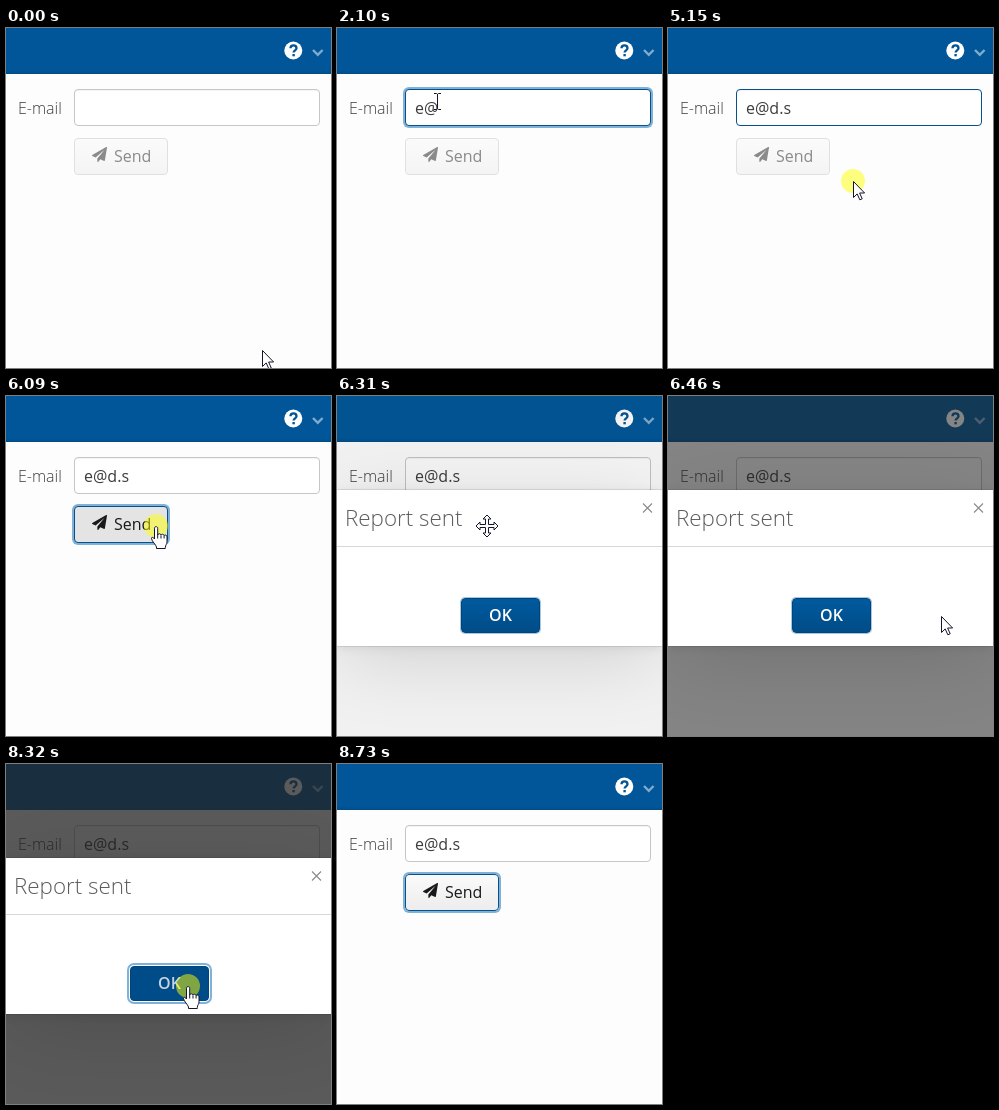
An HTML page for the animation above (9420 ms loop, 325 px wide and 340 px high).

```html
<!DOCTYPE html>
<html lang="en">
<head>
<meta charset="utf-8">
<title>E-mail form</title>
<style>
  html, body { margin: 0; width: 100%; height: 100%; overflow: hidden; }
  body { background: #fdfdfd; }
  #stage {
    position: relative; width: 325px; height: 340px; overflow: hidden;
    background: #fdfdfd; color: #464646; cursor: default;
    font: 400 16px/37px "Open Sans", sans-serif; white-space: pre;
  }
  #stage div, #stage svg { position: absolute; box-sizing: border-box; }
  svg { left: 0; top: 0; overflow: visible; }

  .bar { left: 0; top: 0; width: 325px; height: 46px; background: linear-gradient(#005698 42px, #004e8a); }
  .label { left: 12px; top: 62px; font-weight: 300; color: #3c3c3c; }

  .field {
    left: 68px; top: 61px; width: 246px; height: 37px;
    border: 1px solid #c6c6c6; border-radius: 4px;
    background: #fff; box-shadow: inset 0 1px 0 #f4f4f4;
    color: #3c3c3c; line-height: 37px; padding-left: 9px;
  }
  .field.focus { border-color: #08508a; box-shadow: 0 0 0 2px #7fb2d9; }
  .field.edge { border-color: #08508a; }
  .caret { left: 0; top: 69px; width: 1px; height: 22px; background: #222; }

  .button { border: 1px solid #c5c5c5; border-radius: 4px; }
  .send {
    left: 68px; top: 110px; width: 94px; height: 37px; padding-left: 39px; line-height: 35px;
    background: linear-gradient(#fafafa 2%, #ededed 98%); color: #191919;
  }
  .send svg { left: 17px; top: 8px; }
  .send.off { opacity: .5; }
  .send.hover { background: linear-gradient(#fff, #f2f2f2); }
  .send.active { background: #e4e4e4; }
  .send.focus, .send.active { border-color: #08508a; box-shadow: 0 0 0 2px #7fb2d9; }

  .shade { inset: 0; background: #222; }
  .dialog {
    left: 0; top: 94px; width: 325px; height: 156px; background: #fff;
    box-shadow: 0 2px 10px rgba(0,0,0,.08), 0 16px 80px -6px rgba(0,0,0,.14), 0 0 0 1px rgba(0,0,0,.09);
  }
  .title {
    left: 0; top: 0; width: 325px; height: 57px; padding-left: 8px;
    border-bottom: 1px solid #d8d8d8; font-size: 22.4px; font-weight: 300; line-height: 56px; color: #5c5c5c;
  }
  .ok {
    left: 124px; top: 108px; width: 79px; height: 35px; line-height: 33px; text-align: center;
    font-weight: 600; color: #fff; border-color: #00467d;
    background: linear-gradient(#005a9f, #004c87); box-shadow: 0 0 0 1px #a9c6de;
  }
  .ok.hover { background: linear-gradient(#005fa7, #00508e); }
  .ok.active { background: #004c88; color: #c6d4e2; }
  .ok.active, .ok.focus { box-shadow: 0 0 0 1px #fff, 0 0 0 3px #7fb2d9; }
</style>
</head>
<body>
<div id="stage">
  <div class="bar"></div>
  <svg width="325" height="46">
    <circle cx="287.3" cy="22.5" r="9" fill="#fff"/>
    <path d="M284.5 20.3c0-3.8 6-3.8 6 0 0 2-2.9 2.1-2.9 4.2" fill="none" stroke="#005698" stroke-width="2.3"/>
    <path d="M286.4 26h2.4v2.3h-2.4z" fill="#005698"/>
    <path d="M307 22l4.8 4.8 4.8-4.8" fill="none" stroke="#80abcc" stroke-width="2.4"/>
  </svg>

  <div class="label">E-mail</div>
  <div class="field" id="field"><span id="text"></span></div>
  <div class="caret" id="caret"></div>
  <div class="button send" id="send"><svg width="15" height="15" viewBox="0 0 1792 1792"><path fill="currentColor" d="M1764 11q33 24 27 64l-256 1536q-5 29-32 45-14 8-31 8-11 0-24-5l-453-185-242 295q-18 23-49 23-13 0-22-4-42-15-42-60v-349l864-1059-1069 925-395-162q-37-14-40-55-2-40 32-59l1664-960q15-9 32-9 20 0 36 11z"/></svg>Send</div>

  <div class="shade" id="shade"></div>
  <div class="dialog" id="dialog">
    <div class="title">Report sent</div>
    <svg width="325" height="57"><path d="M306 13.5l9 9m0-9l-9 9" stroke="#8a8a8a" stroke-width="1.1"/></svg>
    <div class="button ok" id="ok">OK</div>
  </div>

  <svg width="325" height="340">
    <g id="pointer" stroke="#14142b" fill="#fff" stroke-linejoin="round">
      <circle id="click" r="12" fill="#ff0" fill-opacity=".5" stroke="none"/>
      <path id="arrow" d="M.5.5v16l3.7-3.6 2.6 5.9 2.4-1-2.6-5.8h5z"/>
      <path id="beam" fill="none" d="M-3-7.5h2.5l1 .8 1-.8H4M.5-7V8M-3 8.5h2.5l1-.8 1 .8H4"/>
      <g id="hand">
        <path d="M-1.5 13V2.2C-1.5.1 1.7.1 1.7 2.2V9c.2-1.8 3.2-1.6 3.3.2 .3-1.5 3-1.2 3.1.5 .4-1.2 2.9-.9 2.9 1.1V16c0 2-1.5 3-1.7 5.5V22.5H.5v-1.5c-.6-2.2-4.5-5.6-5-8.4-.3-1.8 1.8-1.6 3 .4z"/>
        <path fill="none" d="M1.7 9v3.5M5 9.5v3M8.1 10v2.5"/>
      </g>
      <path id="move" d="M0-11l4 4h-2.5v5.5h5.5v-2.5l4 4-4 4v-2.5h-5.5v5.5h2.5l-4 4-4-4h2.5v-5.5h-5.5v2.5l-4-4 4-4v2.5h5.5v-5.5h-2.5z"/>
    </g>
  </svg>
</div>

<script>
  const LOOP = 9420;
  const ADDRESS = 'e@d.s';
  const KINDS = ['arrow', 'beam', 'hand', 'move'];

  // Each track holds its value from the given time until the next entry.
  const pointer = [
    [0, 'arrow', 256, 322], [70, 'arrow', 222, 258], [150, 'arrow', 158, 148],
    [220, 'beam', 108, 78], [300, 'beam', 100, 73],
    [4280, 'beam', 80, 86], [4360, 'arrow', 96, 128], [4430, 'arrow', 150, 172], [4510, 'arrow', 179, 183],
    [4680, 'arrow', 182, 172], [4760, 'arrow', 184, 160], [4840, 'arrow', 185, 153],
    [5390, 'arrow', 178, 149], [5460, 'hand', 160, 138], [5540, 'hand', 153, 132], [5620, 'hand', 150, 130],
    [6310, 'move', 150, 130], [6390, 'arrow', 222, 182], [6460, 'arrow', 273, 220],
    [6780, 'arrow', 250, 230], [6860, 'arrow', 208, 236], [6940, 'hand', 182, 235], [7160, 'hand', 182, 222],
    [8730, 'none', 0, 0]
  ];
  const click = [[0, 0], [540, 1], [700, 0], [5150, 1], [5290, 0], [6090, 1], [6230, 0], [8320, 1], [8490, 0]];
  const typed = [[0, 0], [780, 1], [1640, 2], [2880, 3], [3410, 4], [3810, 5]];
  const caret = [
    [0, 0], [540, 1], [1090, 0], [1640, 1], [2100, 0], [2650, 1], [3180, 0],
    [3410, 1], [3730, 0], [3810, 1], [4360, 0], [4870, 1], [5150, 0]
  ];
  const field = [[0, ''], [540, 'edge'], [620, 'focus'], [5150, 'edge'], [5290, '']];
  const send = [[0, 'off'], [5290, ''], [5460, 'hover'], [6090, 'active'], [6230, 'focus']];
  const ok = [[0, ''], [6940, 'hover'], [8320, 'active'], [8490, 'focus']];
  const shade = [[0, 0], [6310, .05], [6390, .32], [6460, .55], [6540, .68], [6620, .74], [8570, 0]];
  const dialog = [[0, 0], [6230, .5], [6310, 1], [8570, .6], [8650, .2], [8730, 0]];

  const $ = id => document.getElementById(id);
  const entryAt = (track, t) => track.filter(e => e[0] <= t).pop();
  const at = (track, t) => entryAt(track, t)[1];
  const show = (id, on) => { $(id).style.visibility = on ? 'visible' : 'hidden'; };

  function draw(t) {
    const [, kind, x, y] = entryAt(pointer, t);
    $('pointer').setAttribute('transform', `translate(${x} ${y})`);
    KINDS.forEach(k => show(k, k === kind));
    show('click', at(click, t));

    $('text').textContent = ADDRESS.slice(0, at(typed, t));
    $('caret').style.left = Math.round(78 + $('text').getBoundingClientRect().width) + 'px';
    show('caret', at(caret, t));

    $('field').className = 'field ' + at(field, t);
    $('send').className = 'button send ' + at(send, t);
    $('ok').className = 'button ok ' + at(ok, t);
    $('shade').style.opacity = at(shade, t);
    $('dialog').style.opacity = at(dialog, t);
  }

  const start = performance.now();
  function tick() {
    draw((performance.now() - start) % LOOP);
    requestAnimationFrame(tick);
  }
  tick();
</script>
</body>
</html>
```
